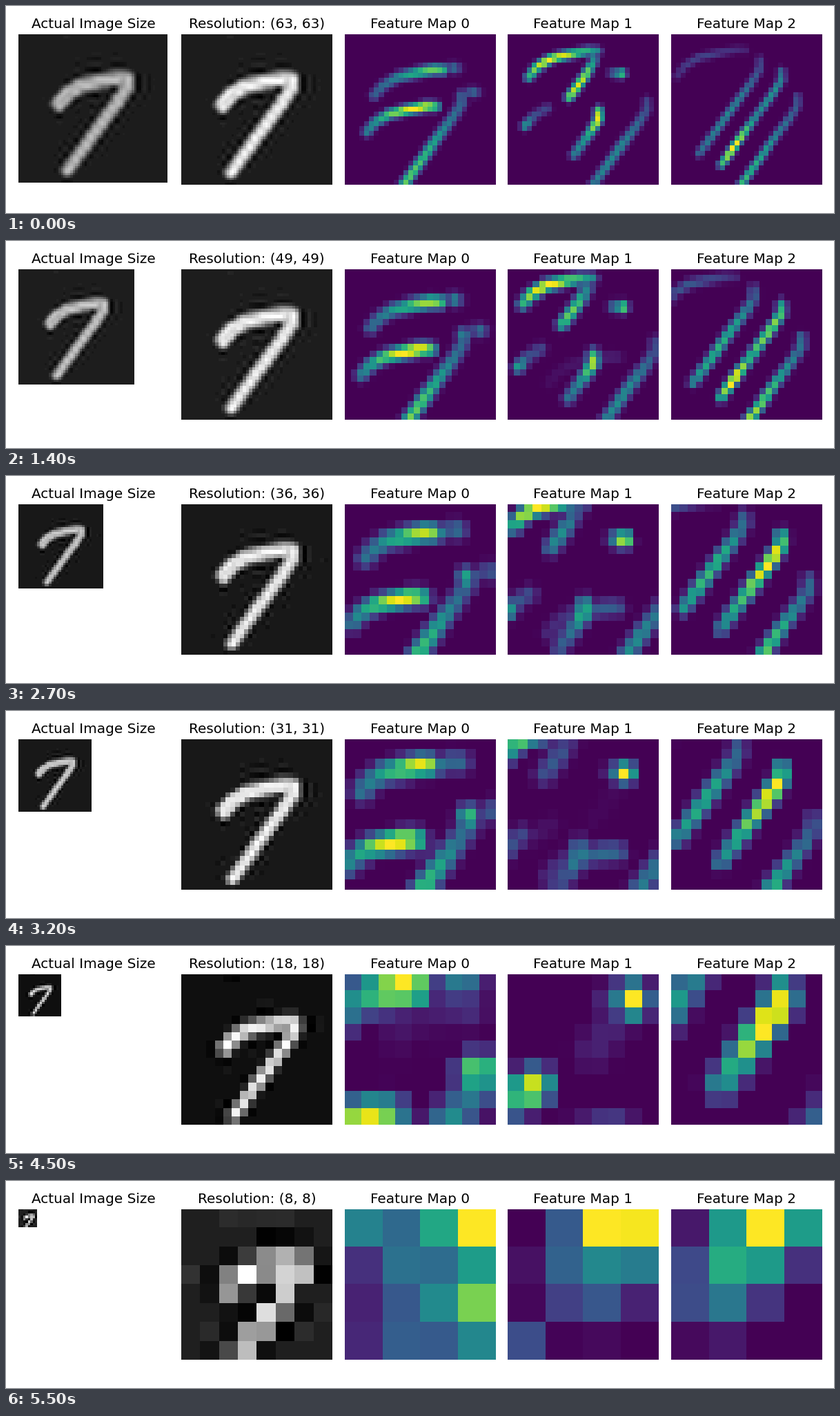
Write a matplotlib script that moves like this. It is 1200 px wide and 300 px high and loops after 5600 ms.

```python
import numpy as np
import matplotlib.pyplot as plt
from matplotlib.animation import FuncAnimation

plt.rcParams["font.family"] = "DejaVu Sans"
W, H, DPI = 1200, 300, 120
FULL, LAST, BASE = 63, 8, 28
SHEET = 64

# Pen path of the digit, in percent of the picture
PEN = np.array([(27.5, 47), (33, 40.5), (42, 35), (55, 32), (67, 29.8), (73, 30),
                (73, 36), (67, 45.5), (56.5, 59.5), (43.5, 77.5), (33, 92)])
BAR, TIP, CORNER = PEN[:6], PEN[:3], PEN[4:6]
STEM, UPPER, LOWER = PEN[5:], PEN[5:9], PEN[8:]

# Every filter answers with echoes of pen sections, moved by a fixed number
# of image pixels: section, dx, dy, brightest spot along the section,
# strength at the finest and at the coarsest resolution.
FILTERS = [
    (1.1, [(BAR, -5, -3.8, 0.8, 0.75, 1.1),
           (CORNER, 1, -4.5, 0.5, 0.4, 0.9),
           (BAR, -8, 11.5, 0.7, 1.0, 0.8),
           (STEM, 2.7, 6.5, 0.9, 0.75, 0.5),
           (UPPER, 2.7, 6.5, 0, 0.3, 1.2),
           (CORNER, 9, 5.5, 0.5, 0.4, 0.4),
           (BAR, 1.5, -1.5, 1, -1.2, 1.0),
           (BAR, 1.5, 2.5, 1, -1.2, 0.8)]),
    (1.0, [(BAR, -8.5, -11.5, 0.4, 0.95, 0.3),
           (UPPER, -10, -11, 0.8, 0.9, -1),
           (CORNER, 1.5, -2.3, 0.9, 0.7, 1.3),
           (UPPER, 0, -1.5, 0, -0.2, 0.5),
           (UPPER, -8, 13, 0.3, 0.95, -0.6),
           (TIP, -10, 9, 0, 0.5, 0.4),
           (TIP, -4.3, 7, 0.8, -1.5, 3),
           (STEM, 12, 9, 0.7, 0.45, 0.2),
           (BAR, 0, 14, 0.8, -0.05, 1)]),
    (0.85, [(STEM, 0, -3.3, 0.4, 0.5, 1.1),
            (LOWER, 0, -3.3, 0.6, 1.0, -1.2),
            (STEM, 6.5, 7.5, 0.9, 0.65, 0.2),
            (STEM, -9, -8, 0.7, 0.45, 0.4),
            (BAR, -15, -12, 0.4, 0.2, 0.1)]),
]


def near(x, y, p, q):
    """Distance to the segment p-q and the position of the foot point."""
    dx, dy = q - p
    t = ((x - p[0]) * dx + (y - p[1]) * dy) / (dx * dx + dy * dy)
    t = np.clip(t, 0, 1)
    return np.hypot(x - p[0] - t * dx, y - p[1] - t * dy), t


def along(path, x, y):
    """Distance to each piece of a path, with the progress 0..1 along it."""
    last = len(path) - 1
    for k in range(last):
        d, t = near(x, y, path[k], path[k + 1])
        yield d, (k + t) / last


def draw_digit():
    c = np.arange(BASE) * 100 / BASE + 0.8
    x, y = np.meshgrid(c, c)
    img = np.zeros((BASE, BASE))
    for d, t in along(PEN, x, y):
        half = 5.0 - 1.2 * t
        img = np.maximum(img, np.clip((half - d) * BASE / 100 + 0.5, 0, 1))
    return img


def resample(img, n):
    """Band-limited resize, which leaves ripples around the strokes."""
    x = np.arange(n)[:, None] * BASE / n - np.arange(BASE)
    size = min(n, BASE)
    m = np.arange(1, size // 2 + 1)
    weight = np.where(2 * m == size, 1, 2)
    r = (1 + (weight * np.cos(2 * np.pi * x[..., None] * m / BASE)).sum(-1)) / BASE
    out = r @ img @ r.T
    return np.where(np.abs(out) < 0.03, 0, out)


def feature(width, echoes, n):
    m = n // 2
    c = (np.arange(m) + 0.5) * 100 / m
    x, y = np.meshgrid(c, c)
    w = (width + 2.5 / n) * 100 / m
    coarse = np.log(FULL / n) / np.log(FULL / LAST)
    out = np.zeros((m, m))
    for path, dx, dy, peak, first, last in echoes:
        power = np.clip(first + (last - first) * coarse, 0, 1)
        shift = np.array([dx, dy]) * 100 / n
        for d, t in along(path + shift, x, y):
            glow = 0.4 + 0.6 * np.exp(-((t - peak) / 0.4) ** 2)
            spot = 1.08 * np.exp(-(d / w) ** 2) - 0.08
            out = np.maximum(out, power * glow * spot)
    return out / out.max()


def panel(i, title, cmap):
    side = 218.4
    ax = fig.add_axes([(18 + 236.4 * i) / W, 40.8 / H, side / W, side / H])
    ax.axis("off")
    im = ax.imshow(np.zeros((2, 2)), cmap=cmap, vmin=0, vmax=1, aspect="auto",
                   extent=(0, 1, 1, 0), interpolation="nearest")
    return im, ax.set_title(title, fontsize=12, pad=5.4)


fig = plt.figure(figsize=(W / DPI, H / DPI), dpi=DPI, facecolor="white")
actual, _ = panel(0, "Actual Image Size", "gray")
scaled, label = panel(1, "", "gray")
maps = [panel(2 + k, f"Feature Map {k}", "viridis")[0] for k in range(3)]
DIGIT = draw_digit()


def update(i):
    n = FULL - i
    img = resample(DIGIT, n)
    lo, hi = img.min(), img.max()
    img = (img - lo) / (hi - lo)
    scaled.set_data(img)
    label.set_text(f"Resolution: ({n}, {n})")

    # The small copy is a little dimmer and sits on a white sheet
    back = -lo / (hi - lo)
    gain = 0.9 - 0.16 * (n - LAST) / (FULL - LAST)
    sheet = np.ones((SHEET, SHEET))
    sheet[:n, :n] = np.where(img > back, back + (img - back) * gain, img)
    actual.set_data(sheet)

    for im, (width, echoes) in zip(maps, FILTERS):
        im.set_data(feature(width, echoes, n))
    return [actual, scaled, label, *maps]


anim = FuncAnimation(fig, update, frames=FULL - LAST + 1, interval=100,
                     repeat=True, repeat_delay=0, blit=False)
plt.show()
```
